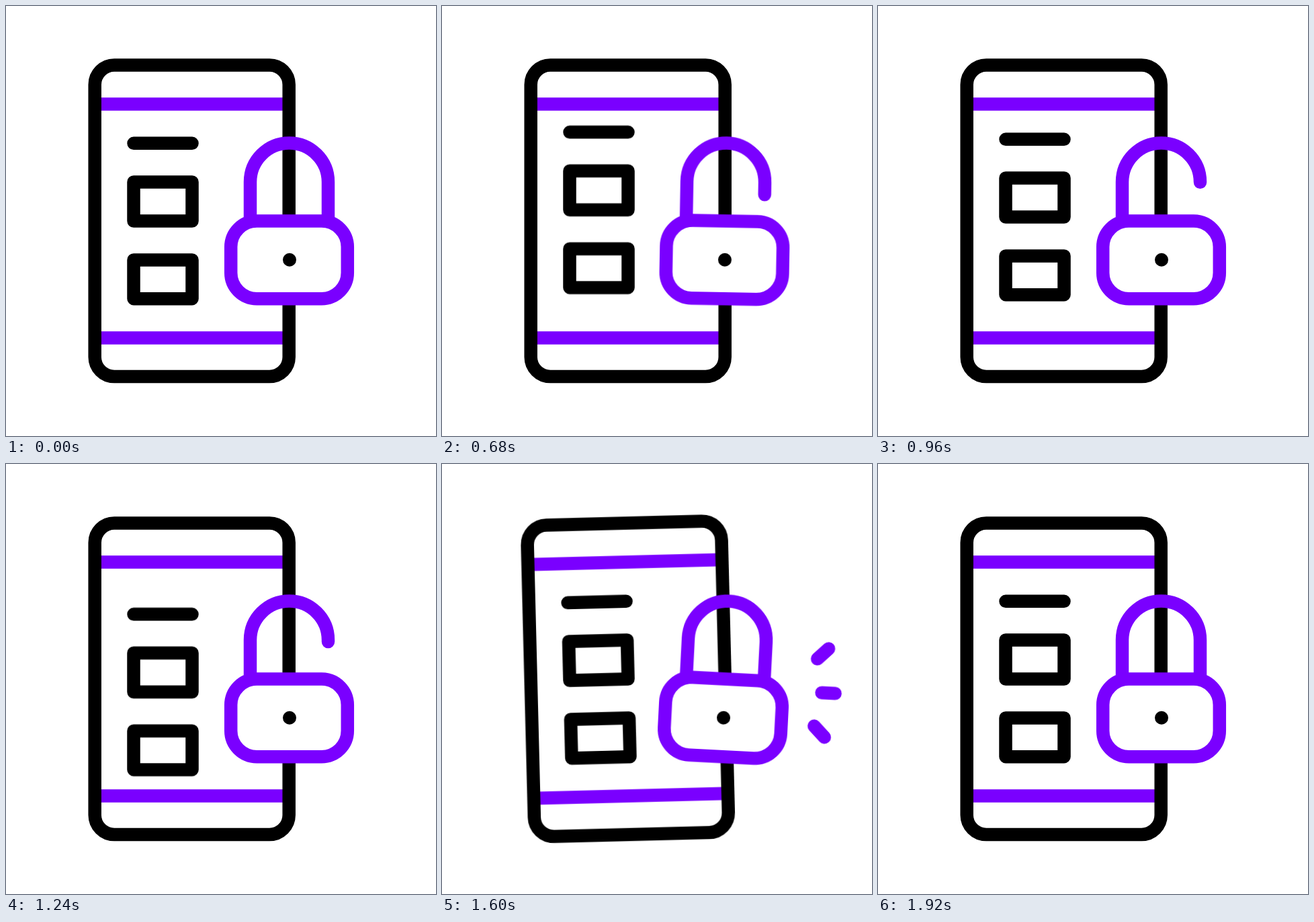
Animation, 640 px wide and 640 px high, one loop 2.48 s. Source, as an HTML page:

```html
<!DOCTYPE html>
<html lang="en">
<head>
<meta charset="utf-8">
<title>Phone lock</title>
<style>
  html, body { margin: 0; width: 100%; height: 100%; overflow: hidden; background: #fff; }
  svg { display: block; width: 100%; height: 100%; }
  .line { fill: none; stroke: #000; stroke-width: 19.5; stroke-linecap: round; stroke-linejoin: round; }
  .accent { stroke: #7a00ff; }
  .flat { stroke-linecap: butt; }
  .body { fill: #fff; }

  .phone, .lock, .list, .shackle, .rays path {
    animation: 2480ms cubic-bezier(.37, 0, .63, 1) infinite;
  }
  .phone { transform-origin: 276.7px 319.7px; animation-name: sway; }
  .lock { transform-origin: 421.5px 320px; animation-name: shake; }
  .list { animation-name: scroll; }
  .shackle { stroke-dasharray: 298.2; animation-name: open; }
  .rays path { animation-name: burst; }
  .rays { animation: show 2480ms step-end infinite; }

  @keyframes scroll {
    0%, 19.355% { transform: translateY(0); }
    33.871% { transform: translateY(-28px); }
    45.161% { transform: translateY(28px); }
    58.065%, 100% { transform: translateY(0); }
  }
  @keyframes open {
    0%, 19.355% { stroke-dashoffset: 0; }
    32.258%, 48.387% { stroke-dashoffset: 58; }
    61.29%, 100% { stroke-dashoffset: 0; }
  }
  @keyframes shake {
    0%, 19.355% { transform: rotate(0deg); }
    24.194% { transform: rotate(-2deg); }
    29.032% { transform: rotate(2deg); }
    33.871%, 53.226% { transform: rotate(0deg); }
    58.065% { transform: rotate(-4deg); }
    62.903% { transform: rotate(4deg); }
    67.742%, 100% { transform: rotate(0deg); }
  }
  @keyframes sway {
    0%, 53.226% { transform: rotate(0deg); }
    58.065% { transform: rotate(1.95deg); }
    62.903% { transform: rotate(-1.95deg); }
    67.742%, 100% { transform: rotate(0deg); }
  }
  @keyframes burst {
    0%, 51.613% { stroke-dasharray: 0 2; stroke-dashoffset: 0; }
    64.516% { stroke-dasharray: .5 2; stroke-dashoffset: -.5; }
    77.419%, 100% { stroke-dasharray: 0 2; stroke-dashoffset: 0; }
  }
  @keyframes show {
    0% { opacity: 0; }
    52.4% { opacity: 1; }
    76.6%, 100% { opacity: 0; }
  }
</style>
</head>
<body>
<svg viewBox="0 0 640 640">
  <g class="phone">
    <path class="line accent flat" d="M141 146H412M141 494H412"/>
    <rect class="line" x="132.2" y="88" width="289" height="463.5" rx="29"/>
    <path class="line list" d="M190 204.3H277M190 262H277V320H190ZM190 378H277V435.7H190Z"/>
  </g>
  <g class="lock">
    <path class="line accent shackle" d="M363.5 320V262A58 58 0 0 1 479.5 262V320"/>
    <rect class="line accent body" x="334.7" y="320" width="173.6" height="115.7" rx="38.6"/>
    <circle cx="422" cy="377.8" r="10"/>
    <g class="rays">
      <path class="line accent" pathLength="1" d="M541 299L573 267"/>
      <path class="line accent" pathLength="1" d="M546 333H586"/>
      <path class="line accent" pathLength="1" d="M541 367L573.5 399"/>
    </g>
  </g>
</svg>
</body>
</html>
```
